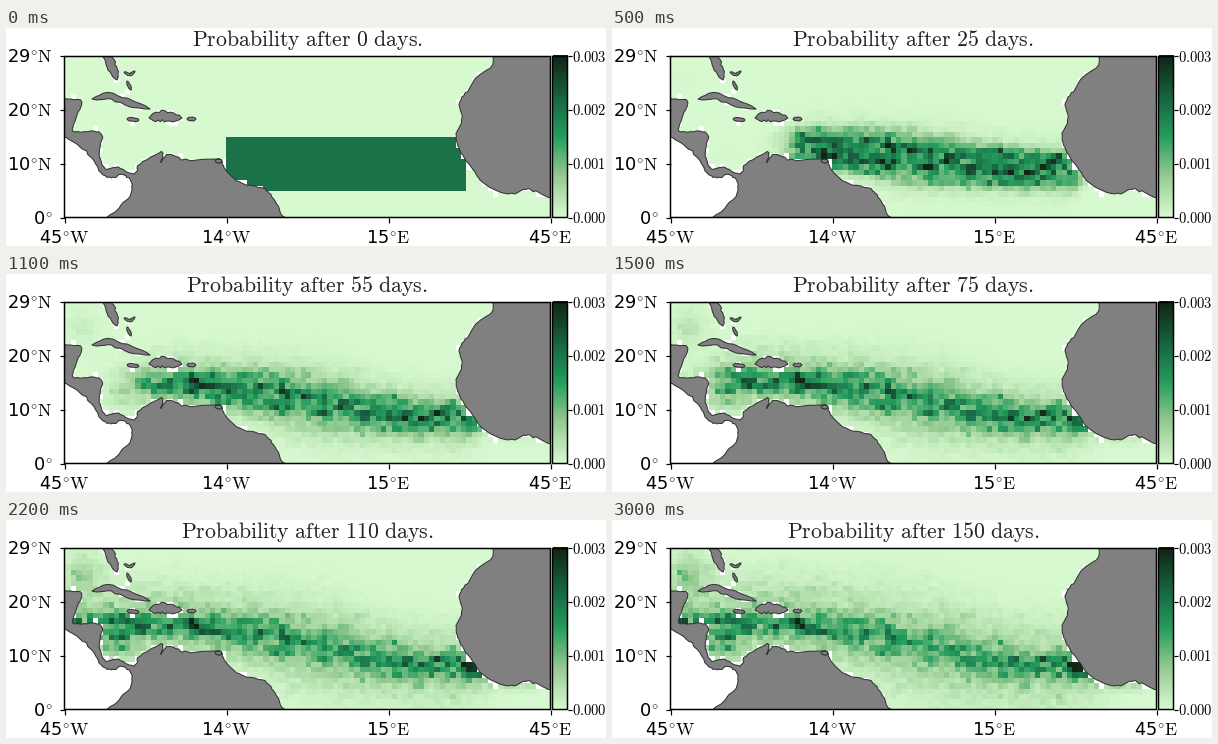
These frames come from a looping animation (600x218 px, 3100 ms). A matplotlib script:

```python
import numpy as np
import matplotlib.pyplot as plt
from matplotlib.animation import FuncAnimation
from matplotlib.colors import LinearSegmentedColormap
from matplotlib.patches import Polygon, Rectangle
from matplotlib.path import Path

plt.rcParams["font.family"] = "DejaVu Sans"
plt.rcParams["mathtext.fontset"] = "cm"

W, H, DPI = 600, 218, 100
LEFT, RIGHT, TOP, BOTTOM = 58.5, 544.5, 28.5, 189.5
BAR_L, BAR_R = 546.5, 561.5
PX = 72 / DPI
FRAMES, STEP_DAYS = 31, 5

ALGAE = LinearSegmentedColormap.from_list(
    "algae", ["#d7f9d0", "#96cb92", "#259c5c", "#176241", "#122414"])
rng = np.random.default_rng(12)


def coast(points, steps=6, rough=0.4):
    """Closed Catmull-Rom curve through key points, slightly ragged."""
    p = np.array(points, float)
    a, b, c, d = (np.roll(p, k, axis=0)[:, None] for k in (1, 0, -1, -2))
    t = np.linspace(0, 1, steps, endpoint=False)[None, :, None]
    curve = b + 0.5 * t * (c - a + t * (2 * a - 5 * b + 4 * c - d
                                        + t * (3 * (b - c) + d - a)))
    curve = curve.reshape(-1, 2)
    return curve + rng.normal(0, rough, curve.shape)


def island(width, *points):
    """Tapered ragged band along a few points."""
    p = np.array(points, float)
    t = np.linspace(0, 1, 14)
    knots = np.linspace(0, 1, len(p))
    mid = np.column_stack([np.interp(t, knots, p[:, k]) for k in (0, 1)])
    along = np.gradient(mid, axis=0)
    normal = along[:, ::-1] * [-1, 1] / np.hypot(*along.T)[:, None]
    side = (width * np.sqrt(np.sin(np.pi * t)))[:, None] * normal
    top = mid + side * rng.uniform(0.7, 1.2, (14, 1))
    low = mid - side * rng.uniform(0.7, 1.2, (14, 1))
    return np.vstack([top, low[::-1]])


# Key points in stage pixels
americas = coast([
    (50, 74), (66, 71), (76, 74), (70, 90), (67, 103), (84, 103), (96, 107),
    (93, 125), (99, 141), (112, 139), (128, 146), (134, 136), (156, 124),
    (155, 134), (163, 126), (180, 132), (213, 131), (218, 140), (233, 154),
    (256, 160), (266, 169), (274, 184), (270, 200), (106, 200), (113, 180),
    (125, 166), (124, 152), (115, 146), (107, 150), (95, 145), (83, 126),
    (66, 113), (50, 103)])
africa = coast([
    (492, 18), (487, 37), (472, 48), (463, 61), (454, 74), (456, 92),
    (450, 108), (454, 122), (464, 138), (480, 157), (502, 166), (520, 161),
    (530, 163), (552, 157), (560, 18)])
lands = [
    americas, africa,
    island(5, (99, 20), (105, 37), (111, 52)),
    island(3.5, (86, 71), (103, 67), (123, 75), (144, 81)),
    island(5, (143, 90), (157, 88), (176, 90)),
    island(2, (121, 91), (133, 92)),
    island(2, (181, 91), (190, 91)),
    island(1.5, (118, 44), (124, 47), (129, 43)),
    island(1.5, (121, 53), (125, 62)),
    island(2, (209, 133), (216, 133))]
pacific = [(50, 103), (83, 126), (107, 147), (124, 152), (124, 200), (50, 200)]

# Cell grid, aligned with the release box
x_edges = 220 + 5.34 * np.arange(-31, 62)
y_edges = 109.2 + 5.4 * np.arange(-16, 17)
X, Y = np.meshgrid((x_edges[:-1] + x_edges[1:]) / 2,
                   (y_edges[:-1] + y_edges[1:]) / 2)
U = (X - LEFT) / (RIGHT - LEFT)


def covered(shape, dx=0, dy=0):
    spots = np.column_stack([(X + dx).ravel(), (Y + dy).ravel()])
    return Path(shape).contains_points(spots).reshape(X.shape)


# Cells on land hold no data, nor do some that only touch it
dry = covered(pacific)
touching = np.zeros(X.shape, bool)
for shape in lands:
    dry |= covered(shape)
    for dx in (-2.6, 2.6):
        for dy in (-2.6, 2.6):
            touching |= covered(shape, dx, dy)
dry |= touching & (rng.random(X.shape) < 0.2)

release = (X > 220) & (X < 460.3) & (Y > 109.2) & (Y < 163.2)


def grain():
    n = rng.standard_normal(X.shape)
    n = n + 0.35 * np.roll(n, 1, axis=1)
    return np.clip(n / n.std(), -2.3, 2.3)


grain_a, grain_b = grain(), grain()


def bell(x, mid, spread):
    return np.exp(-((x - mid) / spread) ** 2)


def rise(x, edge, soft):
    return 0.5 + 0.5 * np.tanh((x - edge) / (2 * soft))


def ramp(v, lo, hi):
    t = np.clip((v - lo) / (hi - lo), 0, 1)
    return t * t * (3 - 2 * t)


# Where the drift gathers: x, y, spread x, spread y, strength
POOLS = [(76, 54, 17, 20, .22), (112, 125, 17, 14, .25),
         (466, 145, 15, 10, .5), (512, 164, 26, 7, .14)]


def density(day):
    """A flat box that bends into a band while its west end drifts on."""
    if day == 0:
        return np.ma.array(0.68 * release, mask=dry)
    bend = 1 - np.exp(-day / 35)
    band = 102 + 44 * ramp(U, 0.2, 0.8)
    dist = np.abs(Y - (136 + bend * (band - 136)))
    half = 27 + bend * (12 * bell(U, 0.5, 0.13) - 15.5)
    reach = half + 4 + 0.17 * day

    level = 0.7 * np.exp(-day / 600) * (1 - 0.25 * bend * bell(U, 0.48, 0.15))
    level = level * rise(X, 220 - 1.55 * day, min(1 + 0.3 * day, 13))
    level = level * rise(-X, -462 - 0.15 * day, 2 + 0.06 * day)

    core = np.exp(-(dist / half) ** (2 + 6 * np.exp(-day / 20)))
    share = 0.4 * bend
    value = level * ((1 - share) * core + share * bell(dist, 0, reach))
    for x, y, sx, sy, gain in POOLS:
        value = value + gain * ramp(day, 10, 140) * bell(X, x, sx) * bell(Y, y, sy)

    turn = day / 150
    noise = np.cos(turn) * grain_a + np.sin(turn) * grain_b
    rough = 0.28 * (1 - np.exp(-day / 5))
    return np.ma.array(value * np.exp(rough * noise - rough ** 2 / 2), mask=dry)


fig = plt.figure(figsize=(W / DPI, H / DPI), dpi=DPI, facecolor="white")
ax = fig.add_axes([0, 0, 1, 1])
ax.axis("off")


def outline(left, right):
    box = Rectangle((left, TOP), right - left, BOTTOM - TOP, fill=False,
                    ec="black", lw=1.5 * PX, snap=False, zorder=5)
    return ax.add_patch(box)


map_box = outline(LEFT, RIGHT)
outline(BAR_L, BAR_R)
mesh = ax.pcolormesh(x_edges, y_edges, density(0), cmap=ALGAE, vmin=0, vmax=1,
                     antialiased=False, zorder=1)
mesh.set_clip_path(map_box)
for shape in lands:
    land = ax.add_patch(Polygon(shape, fc="#808080", ec="#303030", lw=PX,
                                joinstyle="round", zorder=3))
    land.set_clip_path(map_box)
ax.imshow(np.linspace(1, 0, 256)[:, None], cmap=ALGAE, vmin=0, vmax=1,
          extent=(BAR_L, BAR_R, BOTTOM, TOP), aspect="auto", zorder=2)
ax.set_xlim(0, W)
ax.set_ylim(H, 0)


def tick(xs, ys):
    ax.plot(xs, ys, color="black", lw=1.2 * PX, solid_capstyle="butt", zorder=5)


def degrees(number, side):
    return rf"$\mathregular{{{number}}}^{{\circ}}\mathrm{{{side or ' '}}}$"


for i, (number, side) in enumerate([(45, "W"), (14, "W"), (15, "E"), (45, "E")]):
    x = LEFT + i * (RIGHT - LEFT) / 3
    tick([x, x], [BOTTOM, BOTTOM + 5])
    ax.text(x, 215, degrees(number, side), size=12.8, ha="center", va="baseline")

for i, (number, side) in enumerate([(29, "N"), (20, "N"), (10, "N"), (0, "")]):
    y = TOP + i * (BOTTOM - TOP) / 3
    tick([LEFT - 5, LEFT], [y, y])
    tick([BAR_R, BAR_R + 4], [y, y])
    ax.text(46.5, y + 6, degrees(number, side), size=12.8, ha="right",
            va="baseline")
    ax.text(566.5, y + 5, rf"$\mathrm{{0.00{3 - i}}}$", size=10.4, va="baseline")

title = ax.text(301, 17.5, "", size=15.7, color="#222222", ha="center",
                va="baseline")


def update(i):
    day = i * STEP_DAYS
    mesh.set_array(density(day))
    title.set_text(rf"$\mathrm{{Probability\ after\ {day}\ days.}}$")
    return mesh, title


anim = FuncAnimation(fig, update, frames=FRAMES, interval=100, repeat=True)
plt.show()
```
